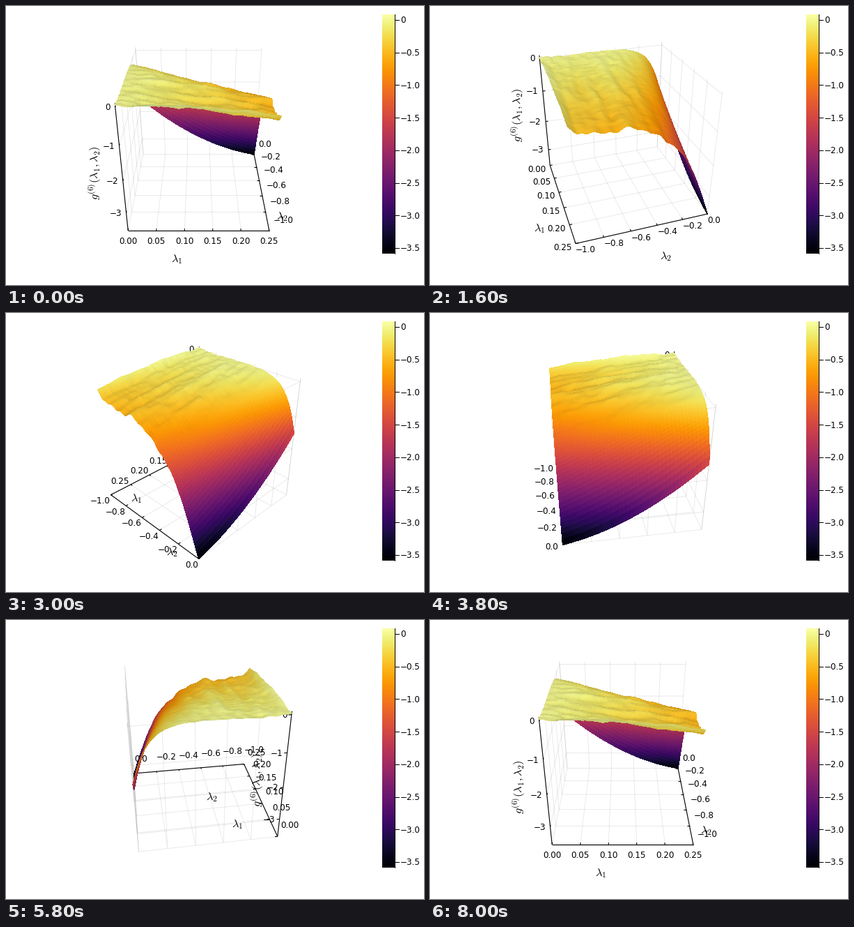
Write a matplotlib script that moves like this. It is 600 by 400 pixels and loops after 8070 ms.

```python
import numpy as np
import matplotlib.pyplot as plt
from matplotlib.animation import FuncAnimation
from matplotlib.collections import LineCollection, PolyCollection

W, H, DPI = 600, 400, 100
PX = 72 / DPI

# The view turns 3 degrees at a time, 15 times a second
FRAMES, LOOP = 202, 8070
TURN, TURN_MS = np.radians(3), 200 / 3

# Perspective camera: 30 degree field of view, 30 degree elevation
CX, CY, HALF = 276.5, 183.5, 171.7
FOCAL = HALF / np.tan(np.radians(15))
DIST = np.sqrt(3) / np.sin(np.radians(15))
CE, SE = np.cos(np.radians(30)), np.sin(np.radians(30))

Z_MIN, Z_RANGE = -3.589, 3.675
NX, NY = 40, 80

plt.rcParams["font.family"] = "DejaVu Sans"
plt.rcParams["mathtext.fontset"] = "cm"
cmap = plt.get_cmap("inferno")


def project(x, y, z, az):
    c, s = np.cos(az), np.sin(az)
    right, away = x * c + y * s, y * c - x * s
    k = FOCAL / (DIST + away * CE - z * SE)
    return np.stack([CX + k * right, CY - k * (z * CE + away * SE)], axis=-1)


def project_points(points, az):
    return project(*np.moveaxis(np.asarray(points, float), -1, 0), az)


def smooth(a, taps, axis):
    w = np.hanning(taps + 2)[1:-1]
    w /= np.sqrt((w ** 2).sum())
    return np.apply_along_axis(np.convolve, axis, a, w, "valid")


def make_surface():
    x, y = np.meshgrid(np.linspace(-1, 1, NX + 1), np.linspace(-1, 1, NY + 1))
    t, u = x + 1, 1 - y
    top = 0.955 - 0.14 * (t / 2) ** 1.5 - 0.1 * t * np.sqrt(np.minimum(y + 1, 1))
    edge = 0.13 - 0.935 * t + 0.185 * t ** 2
    rate = 4.8 * (1.8 / 4.8) ** (t / 2)
    z = top - (top - edge) * np.exp(-rate * u - 1.6 * u ** 2)

    rng = np.random.default_rng(6)
    walk = np.cumsum(smooth(rng.normal(size=(NY + 9, NX + 1)), 9, 0), axis=1)
    bumps = smooth(smooth(rng.normal(size=(NY + 5, NX + 5)), 5, 0), 5, 1)
    fade = 1 / (1 + np.exp(8 * (y - 0.45)))
    z += fade * (0.0045 * walk + 0.006 * bumps)
    return x, y, np.clip(z, -1, 1)


def quads(a):
    return np.stack([a[:-1, :-1], a[:-1, 1:], a[1:, 1:], a[1:, :-1]], axis=2)


SX, SY, SZ = make_surface()
QX, QY, QZ = (quads(a).mean(axis=2).ravel() for a in (SX, SY, SZ))
BASE = cmap((QZ + 1) / 2)[:, :3]
q = quads(SZ)
slope_x = ((q[..., 1] + q[..., 2] - q[..., 0] - q[..., 3]) / 2 * NX / 2).ravel()
slope_y = ((q[..., 2] + q[..., 3] - q[..., 0] - q[..., 1]) / 2 * NY / 2).ravel()
NORMAL = np.stack([-slope_x, -slope_y, np.ones_like(slope_x)], axis=1)
NORMAL /= np.linalg.norm(NORMAL, axis=1, keepdims=True)


def num(v, digits):
    return f"{v:.{digits}f}".replace("-", "\u2212")


# Tick values, cube positions and labels per axis
xv, yv, zv = np.arange(6) * 0.05, np.arange(-5, 1) * 0.2, np.arange(-3, 1)
xt, yt, zt = 8 * xv - 1, 2 * yv + 1, 2 * (zv - Z_MIN) / Z_RANGE - 1
labels = {"x": [num(v, 2) for v in xv],
          "y": [num(v, 1) for v in yv],
          "z": [num(v, 0) for v in zv]}
ticks = {"x": [(p, -1, -1) for p in xt],
         "y": [(1, p, -1) for p in yt],
         "z": [(-1, -1, p) for p in zt]}
spans = {"x": [(-1, -1, -1), (1, -1, -1)],
         "y": [(1, -1, -1), (1, 1, -1)],
         "z": [(-1, -1, -1), (-1, -1, 1)]}
inward = {"x": (0, 0.04, 0), "y": (-0.04, 0, 0), "z": (0, 0.04, 0)}
guides = {"x": (r"$\lambda_1$", -31, 41, 0),
          "y": (r"$\lambda_2$", 31, 41, 0),
          "z": (r"$g^{(6)}(\lambda_1,\lambda_2)$", -39, 1, 90)}

grid3d = ([[(p, -1, -1), (p, 1, -1), (p, 1, 1)] for p in xt]
          + [[(1, p, -1), (-1, p, -1), (-1, p, 1)] for p in yt]
          + [[(-1, -1, p), (-1, 1, p), (1, 1, p)] for p in zt])
lines3d = list(spans.values()) + [
    [p, np.add(p, inward[k])] for k in "xyz" for p in ticks[k]]

fig = plt.figure(figsize=(W / DPI, H / DPI), dpi=DPI, facecolor="white")
ax = fig.add_axes([0, 0, 1, 1])
ax.axis("off")

# Colour bar
ax.imshow(np.linspace(1, 0, 256)[:, None], cmap=cmap, extent=(540, 558, 355, 12),
          aspect="auto", interpolation="nearest", zorder=5)
ax.plot([558, 558], [12, 355], color="black", lw=PX, zorder=6)
for i in range(8):
    y = 20 + 46.72 * i
    ax.plot([558, 564], [y, y], color="black", lw=PX, zorder=6)
    ax.text(566, y + 4.4, num(-0.5 * i, 1) if i else "0", size=12 * PX, zorder=6)
ax.set(xlim=(0, W), ylim=(H, 0))

grid = LineCollection([], colors=[(0, 0, 0, 0.1)], linewidths=0.8 * PX, zorder=1)
lines = LineCollection([], colors="black", linewidths=1.1 * PX, zorder=2)
surface = PolyCollection([], edgecolors="none", antialiaseds=False, zorder=4)
for c in (grid, lines, surface):
    ax.add_collection(c, autolim=False)
tick_text = {k: [ax.text(0, 0, s, size=12 * PX, zorder=3) for s in labels[k]]
             for k in "xyz"}
guide_text = {k: ax.text(0, 0, s, size=16.4 * PX, rotation=rot, ha="center",
                         va="center", zorder=3)
              for k, (s, _, _, rot) in guides.items()}


def tick_style(k, az):
    """Horizontal anchor and offset of an axis' tick labels."""
    if k == "z":
        return "right", -6.5, 0
    (x0, y0), (x1, y1) = project_points(spans[k], az)
    theta = np.arctan2(y0 - y1, x1 - x0)
    if abs(np.sin(theta)) < 1e-6:
        return "center", 0, 14.6 if x1 > x0 else -22
    cp, sp = np.sin(theta), -np.cos(theta)
    theta %= 2 * np.pi
    dx = 6.5 * cp * abs(cp) ** 3
    dy = -7.2 * sp + (-14 if 0 < theta - np.pi / 2 < np.pi else 1 + 1.5 * abs(cp))
    return "right" if theta > 1.5 * np.pi else "left", dx, dy


def update_surface(az):
    c, s = np.cos(az), np.sin(az)
    pts = project(SX, SY, SZ, az)
    verts = np.stack([quads(pts[..., i]) for i in (0, 1)], axis=-1).reshape(-1, 4, 2)
    mid = verts.mean(axis=1, keepdims=True)
    verts = mid + 1.12 * (verts - mid)
    light = np.abs(NORMAL @ np.array([s * CE, -c * CE, SE]))
    shade = np.minimum(0.77 + 0.26 * light, 1)[:, None]
    reach = DIST * CE
    order = np.argsort(-((QX - s * reach) ** 2 + (QY + c * reach) ** 2))
    surface.set_verts(verts[order])
    surface.set_facecolor((BASE * shade)[order])


def update(i):
    az = int((i + 0.5) * LOOP / FRAMES / TURN_MS) * TURN
    grid.set_segments([project_points(p, az) for p in grid3d])
    lines.set_segments([project_points(p, az) for p in lines3d])
    for k in "xyz":
        ha, dx, dy = tick_style(k, az)
        for txt, (x, y) in zip(tick_text[k], project_points(ticks[k], az)):
            txt.set_position((x + dx, y + dy + 4.4))
            txt.set_ha(ha)
        _, gx, gy, _ = guides[k]
        x, y = project_points(np.mean(spans[k], axis=0), az)
        guide_text[k].set_position((x + gx, y + gy))
    update_surface(az)
    return []


anim = FuncAnimation(fig, update, frames=FRAMES, interval=LOOP / FRAMES,
                     init_func=lambda: update(0), repeat=True, repeat_delay=0,
                     blit=False, cache_frame_data=False)
plt.show()
```
